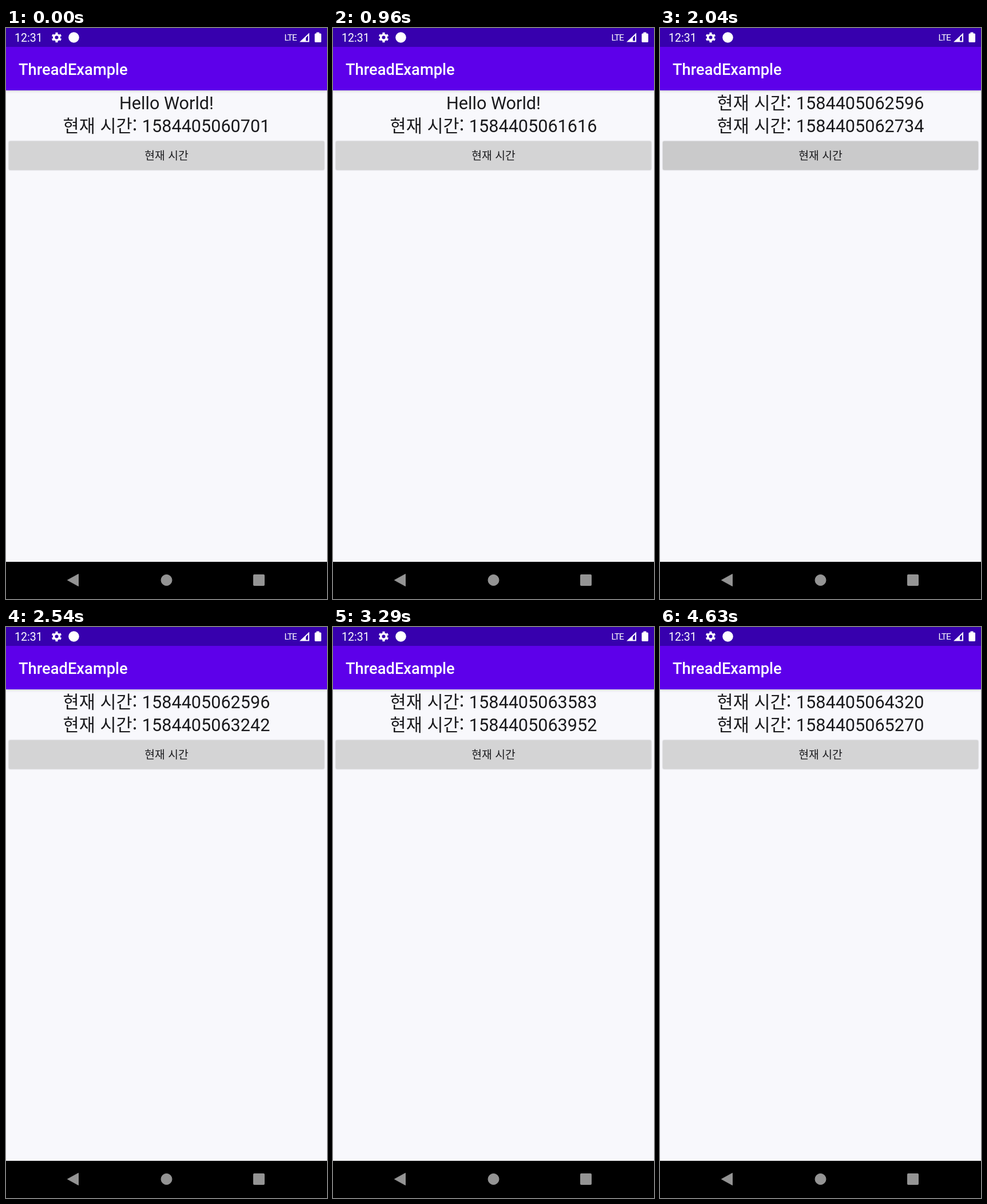
An HTML page that plays this animation: 561 px wide and 998 px high, repeating every 4.67 s.

```html
<!DOCTYPE html>
<html lang="ko">
<head>
<meta charset="utf-8">
<title>ThreadExample</title>
<style>
  html, body { margin: 0; height: 100%; overflow: hidden; background: #f8f8fc; }
  svg { display: block; width: 561px; height: 998px; font-family: Roboto, sans-serif; }
  .ko { font-family: "Noto Sans CJK KR", "Noto Sans CJK", sans-serif; }
  .line { font-size: 30.6px; fill: #1a1a1d; text-anchor: middle; }
</style>
</head>
<body>
<svg viewBox="0 0 561 998">
  <rect width="561" height="998" fill="#f8f8fc"/>
  <rect y="33" width="561" height="76" fill="#5d00ea" style="filter: drop-shadow(0 1px 2px #0003)"/>
  <rect width="561" height="33" fill="#3700ae"/>

  <g fill="#fff">
    <text x="15" y="24" font-size="19.6">12:31</text>
    <g fill="none" stroke="#fff" transform="translate(88.5 16.5)">
      <circle r="4.8" stroke-width="3.6"/>
      <circle r="7.3" stroke-width="3" pathLength="12" stroke-dasharray="1 1" transform="rotate(15)"/>
    </g>
    <circle cx="118.5" cy="16.5" r="9.3"/>
    <text x="486.5" y="22" font-size="15.4" letter-spacing="-.9">LTE</text>
    <path fill-rule="evenodd" d="M513 24.500H530V8.500ZM524 17L528 13V22.500H524Z"/>
    <path d="M542.500 7.500h5v2h2q1.500 0 1.500 1.500v12.500q0 1.500-1.500 1.500h-8.500q-1.500 0-1.500-1.500v-12.500q0-1.500 1.500-1.500h1.500z"/>
    <text x="22" y="81.500" font-size="27.3" font-weight="500">ThreadExample</text>
  </g>

  <text id="clicked" class="line" x="280.5" y="142"></text>
  <text id="running" class="line" x="280.5" y="182"></text>

  <clipPath id="face"><rect x="5" y="198" width="551" height="50" rx="2"/></clipPath>
  <rect id="button" x="5" y="198" width="551" height="50" rx="2" fill="#d4d4d5"/>
  <g clip-path="url(#face)"><circle id="ripple" cy="223"/></g>
  <text class="ko" x="280.5" y="230" font-size="19.3" fill="#1a1a1d" text-anchor="middle">현재 시간</text>

  <rect y="933" width="561" height="65"/>
  <g fill="#949494" stroke="#949494" stroke-linejoin="round">
    <path d="M107.500 965L126.500 954.500V975.500Z"/>
    <circle cx="280.5" cy="965" r="9.5"/>
    <rect x="432.500" y="955.500" width="19" height="19" rx="1"/>
  </g>
</svg>
<script>
const LOOP = 4670, EPOCH = 1584405000000;
const TICK = 101.53, TICK_PHASE = 0.38, PRESS = 124, ENTER = 225, FADE = 150;
// [tick index, clock ms]; ticks between these are evenly spaced
const ticks = [[0, 60701], [4, 61109], [9, 61616], [18, 62531], [25, 63242], [32, 63952], [45, 65270]];
const clicks = [62596, 63583, 64320].map(clock => ({ clock, at: clock - 60742 }));

const $ = id => document.getElementById(id);
const clamp = x => Math.min(1, Math.max(0, x));
const mix = (a, b, p) => a + (b - a) * p;
const ease = x => x * x * (3 - 2 * x);
const stamp = clock => `<tspan class="ko">현재 시간: </tspan>${EPOCH + clock}`;

function clockAt(t) {
  const k = Math.min(45, Math.floor(t / TICK + TICK_PHASE));
  const i = Math.max(1, ticks.findIndex(([n]) => n >= k));
  const [k0, v0] = ticks[i - 1], [k1, v1] = ticks[i];
  return Math.round(mix(v0, v1, (k - k0) / (k1 - k0)));
}

function setText(id, html) {
  const el = $(id);
  if (el.dataset.html !== html) el.innerHTML = el.dataset.html = html;
}

function draw(t) {
  const last = clicks.filter(c => c.at <= t).pop();
  setText('clicked', last ? stamp(last.clock) : 'Hello World!');
  setText('running', stamp(clockAt(t)));

  const press = clicks.filter(c => c.at - PRESS <= t).pop();
  const age = press ? t - press.at + PRESS : -1;
  const spread = ease(clamp(age / ENTER));
  const alpha = 0.11 * clamp(age / 50) * (1 - clamp((age - ENTER) / FADE));
  const lift = clamp(age / 100) * (1 - clamp((age - PRESS) / 100));
  const ripple = $('ripple');
  ripple.setAttribute('cx', mix(297, 280.5, spread));
  ripple.setAttribute('r', mix(166, 280, spread));
  ripple.setAttribute('opacity', alpha);
  $('button').style.filter =
    `drop-shadow(0 ${mix(0.7, 1.6, lift)}px ${mix(1, 2.2, lift)}px rgba(0,0,0,${mix(0.28, 0.36, lift)}))`;
}

function frame() {
  draw(performance.now() % LOOP);
  requestAnimationFrame(frame);
}
frame();
</script>
</body>
</html>
```
